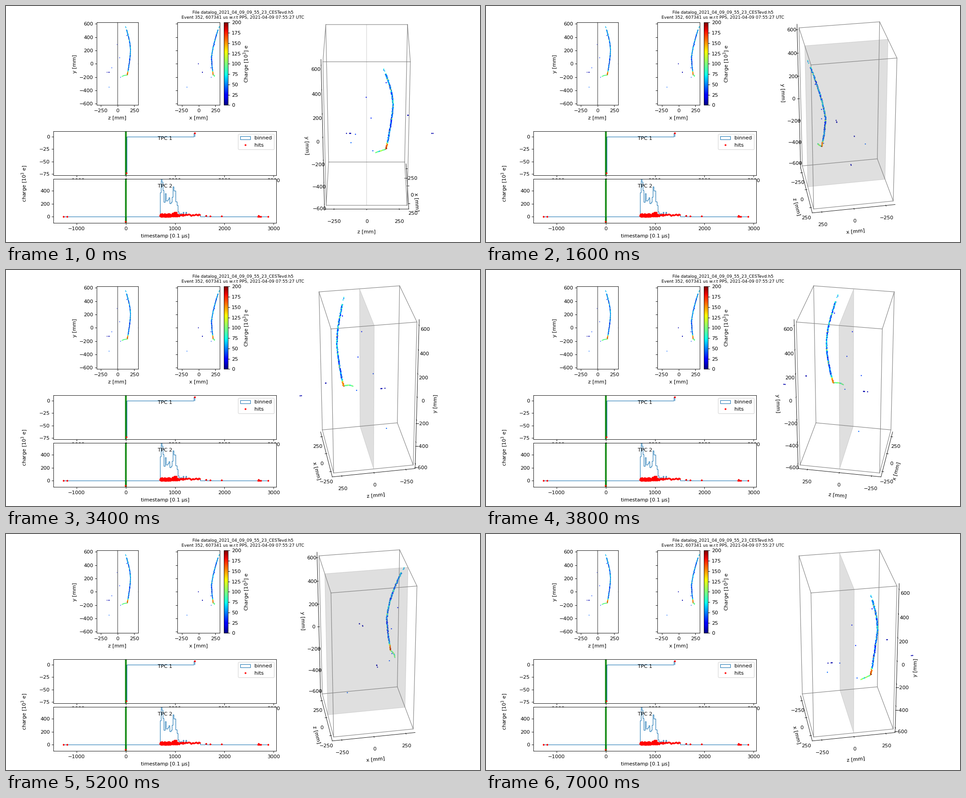
A matplotlib script for the animation above (7.2 s loop, 1040x520 px).

```python
import itertools

import matplotlib.pyplot as plt
import numpy as np
from matplotlib.animation import FuncAnimation
from mpl_toolkits.mplot3d import art3d

W, H, DPI = 1040, 520, 80
HALF, HALF_Y = 310, 620          # detector half sizes in mm
FRAMES, INTERVAL = 36, 200
DRIFT = 0.16                     # mm per timestamp tick
BIN = 20                         # timestamp ticks

plt.rcParams["font.family"] = "DejaVu Sans"
rng = np.random.default_rng(7)
fig = plt.figure(figsize=(W / DPI, H / DPI), dpi=DPI, facecolor="white")


def px_axes(left, top, right, bottom, **kwargs):
    """Axes placed by pixel edges, counted from the top left."""
    return fig.add_axes([left / W, 1 - bottom / H,
                         (right - left) / W, (bottom - top) / H], **kwargs)


def bend(y, turn, below, above, power):
    """Power curve away from y = turn, reaching each amount at the ends."""
    d = np.where(y < turn, (turn - y) / (turn + 168), (y - turn) / (554 - turn))
    return np.where(y < turn, below, above) * d ** power


def make_hits():
    """Rows of x, y, z and charge: the track, its hook and stray hits."""
    y = np.linspace(511, -168, 310)
    y = np.concatenate([[559, 550, 541], y])
    x = 192 + bend(y, 90, 24, 112, 1.4) + rng.uniform(-4, 4, y.size)
    z = 194 - bend(y, 210, 48, 72, 1.6) + rng.uniform(-3.5, 3.5, y.size)
    q = rng.gamma(5, 11, y.size) + 115 * np.clip((-95 - y) / 45, 0, 1)
    track = np.column_stack([x, y, z, q])

    s = np.linspace(0, 1, 26)
    hook = np.column_stack([216 + 20 * np.sin(2 * s), -170 - 19 * s ** 2,
                            144 - 76 * s, rng.normal(95, 16, s.size)])
    hook[:, :2] += rng.uniform(-2, 2, (s.size, 2))

    singles = [(262, 425, 141), (237, 290, -3), (198, 91, 33),
               (181, -60, -84), (188, -202, 47), (-172, -350, -124)]
    groups = [(-2, 0, c) for c in (313, 317)]
    groups += [(56, -127, c) for c in (-154, -130, -126, -122, 497, 507)]
    stray = np.vstack([
        np.column_stack([singles, np.linspace(25, 45, len(singles))]),
        np.column_stack([groups, np.full(len(groups), 8)])])
    return np.vstack([track, hook, stray])


hits = make_hits()
hx, hy, hz, charge = hits.T
colors = dict(c=charge, cmap="jet", vmin=0, vmax=200)

fig.suptitle("File datalog_2021_04_09_09_55_23_CESTevd.h5\n"
             "Event 352, 607341 us w.r.t PPS, 2021-04-09 07:55:27 UTC",
             fontsize="small")

# Flat projections
ax_zy = px_axes(199, 36.4, 290, 218.4)
ax_xy = px_axes(376, 36.4, 469, 218.4)
for ax, u, half, name in ((ax_zy, hz, 309, "z"), (ax_xy, hx, 314.5, "x")):
    dots = ax.scatter(u, hy, s=1, linewidths=0.5, **colors)
    ax.set(xlim=(-half, half), ylim=(-HALF_Y, HALF_Y),
           xticks=(-250, 0, 250), yticks=range(-600, 601, 200),
           xlabel=f"{name} [mm]")
ax_zy.set_ylabel("y [mm]")
ax_zy.axvline(0, color="gray", lw=1.5)
ax_xy.tick_params(labelleft=False)
bar = fig.colorbar(dots, cax=px_axes(478, 36.4, 487.4, 218.4),
                   ticks=range(0, 201, 25))
bar.set_label("Charge [$10^3$] e", labelpad=1.5)

# Charge against time
ax_t1 = px_axes(104.4, 276.4, 593.4, 373.4)
ax_t2 = px_axes(104.4, 381.4, 593.4, 478.4)


def plot_tpc(ax, title, times, charges):
    bins = np.arange(min(0, times.min()), times.max() + 1, BIN)
    ax.hist(times, bins, weights=charges, histtype="step", color="C0",
            lw=1, label="binned", zorder=1)
    ax.axvline(0, color="green", alpha=0.85, lw=3.6, zorder=2)
    ax.plot(times, charges, "r.", ms=5, label="hits", zorder=3)
    ax.text(0.5, 0.81, title, transform=ax.transAxes, ha="center", zorder=4)
    ax.set(xlim=(-1465, 3060), xticks=range(-1000, 3001, 1000))


plot_tpc(ax_t1, "TPC 1", np.array([15, 1400]), np.array([-73, 7]))
ax_t1.set(ylim=(-78, 10.6), yticks=range(-75, 1, 25))
ax_t1.tick_params(axis="x", pad=2.2)
ax_t1.legend(loc="upper right")

in_tpc2 = (np.abs(hz) < 300) & (hz != -84)
plot_tpc(ax_t2, "TPC 2",
         np.append((308 - hz[in_tpc2]) / DRIFT, [-1265, -1190, -5]),
         np.append(charge[in_tpc2] / 3.2, [2, 2, -72]))
ax_t2.set(ylim=(-99, 583), yticks=(0, 200, 400))
ax_t2.set_xlabel("timestamp [0.1 µs]", labelpad=5)
fig.text(41 / W, 1 - 391 / H, "charge [$10^3$ e]", rotation=90,
         ha="center", va="center")

# Rotating detector
ax_3d = px_axes(564.3, 26, 1006.3, 468, projection="3d",
                computed_zorder=False)
ax_3d.set_facecolor("none")
ax_3d.grid(False)
ax_3d.scatter(hx, hz, hy, s=1, linewidths=1.2, depthshade=False, zorder=4,
              **colors)

corners = itertools.product((-HALF, HALF), (-HALF, HALF), (-HALF_Y, HALF_Y))
for a, b in itertools.combinations(corners, 2):
    if sum(p != q for p, q in zip(a, b)) == 1:
        ax_3d.plot(*zip(a, b), color="gray", lw=1, zorder=3)

cathode = plt.Rectangle((-HALF, -HALF_Y), 2 * HALF, 2 * HALF_Y,
                        color="gray", alpha=0.25, lw=1, zorder=5)
ax_3d.add_patch(cathode)
art3d.pathpatch_2d_to_3d(cathode, z=0, zdir="y")

margin = 25 / 24                 # axis lines sit slightly outside the box
ax_3d.set_box_aspect((1, 1, 2))
ax_3d.set(xlim=(-HALF * margin, HALF * margin),
          ylim=(-HALF * margin, HALF * margin),
          zlim=(-HALF_Y * margin, HALF_Y * margin),
          xticks=(-250, 0, 250), yticks=(-250, 0, 250),
          zticks=range(-600, 601, 200),
          xlabel="x [mm]", ylabel="z [mm]")
ax_3d.set_zlabel("y [mm]", labelpad=16)
for axis in (ax_3d.xaxis, ax_3d.yaxis, ax_3d.zaxis):
    axis.set_pane_color((1, 1, 1, 0))


def update(i):
    # The tiny offset settles which edges carry the axes in head-on views.
    ax_3d.view_init(elev=30, azim=360 * i / FRAMES + 0.001)
    return ()


anim = FuncAnimation(fig, update, frames=FRAMES, interval=INTERVAL,
                     repeat=True, repeat_delay=0, blit=False)
plt.show()
```
